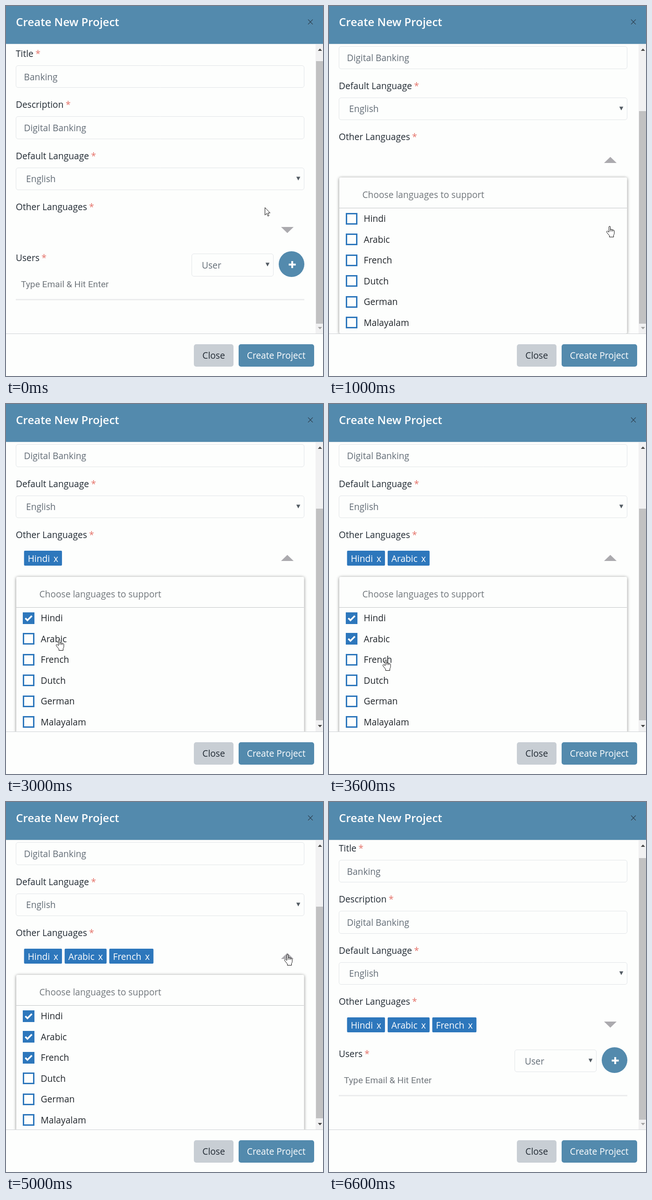
An HTML page with a canvas that plays this animation: 680 px wide and 792 px high, repeating every 7.6 s.

```html
<!DOCTYPE html>
<html lang="en">
<head>
<meta charset="utf-8">
<title>Create New Project</title>
<style>
  html, body { margin: 0; width: 100%; height: 100%; overflow: hidden; background: #fdfefd; }
  canvas { display: block; }
</style>
</head>
<body>
<canvas id="stage" width="680" height="792"></canvas>
<script>
const ctx = document.getElementById('stage').getContext('2d');
const LOOP = 7600, STEP = 200;
const BLUE = '#538aad', ACCENT = '#2d77bc', PAPER = '#fdfefd';
const INK = '#212a33', MUTED = '#626c76', EDGE = '#e2e5e8';
const SANS = '"Open Sans", sans-serif';
const languages = ['Hindi', 'Arabic', 'French', 'Dutch', 'German', 'Malayalam'];
const pickTimes = [2400, 3200, 4000];
const OPEN_AT = 800, CLOSE_AT = 5200;

// Pointer keys: time, x, y, shape
const pointerKeys = [
  [0, 555, 431, 'arrow'], [400, 592, 467, 'arrow'], [600, 595, 471, 'hand'],
  [1200, 595, 471, 'hand'], [2000, 112, 449, 'hand'], [2400, 112, 449, 'hand'],
  [3000, 107, 504, 'hand'], [3200, 107, 504, 'hand'], [3600, 115, 547, 'hand'],
  [4200, 115, 547, 'hand'], [5000, 597, 326, 'hand'], [5200, 615, 338, 'arrow'],
  [6200, 615, 338, 'arrow'], [6400, 626, 319, 'arrow'], [6600, 0, 0, 'none']
];

const arrowPath = new Path2D('M.5.5V16.5L4.3 13L6.8 18.8L9.2 17.8L6.8 12H11.5Z');
const handPath = new Path2D('M5.5 13V2Q5.5.5 7 .5T8.5 2V8Q8.5 6.8 10 6.8T11.5 8.3' +
  'Q11.5 7.4 12.8 7.5T14 9Q14.3 8.2 15.4 8.6T17 10V15.5Q17 17.5 15.5 19.5V23.5H6.5V20.5' +
  'L1.2 14Q0 12 1.2 11T3.7 11.7Z');
const knuckles = new Path2D('M8.5 8V11.5M11.5 8.3V11.5M14 9V11.5');

function text(str, x, y, color = INK, font = '19.2px ' + SANS) {
  ctx.font = font;
  ctx.fillStyle = color;
  ctx.fillText(str, x, y);
  return ctx.measureText(str).width;
}

function rect(x, y, w, h, color) {
  ctx.fillStyle = color;
  ctx.fillRect(x, y, w, h);
}

function box(x, y, w, h, radius, fill, stroke) {
  ctx.beginPath();
  ctx.roundRect(x, y, w, h, radius);
  ctx.fillStyle = fill;
  ctx.fill();
  if (stroke) {
    ctx.strokeStyle = stroke;
    ctx.lineWidth = 1;
    ctx.stroke();
  }
}

// A negative height points the triangle upwards.
function triangle(cx, cy, w, h, color) {
  ctx.beginPath();
  ctx.moveTo(cx - w / 2, cy - h / 2);
  ctx.lineTo(cx + w / 2, cy - h / 2);
  ctx.lineTo(cx, cy + h / 2);
  ctx.fillStyle = color;
  ctx.fill();
}

function line(points, color, width) {
  ctx.beginPath();
  points.forEach(([x, y]) => ctx.lineTo(x, y));
  ctx.strokeStyle = color;
  ctx.lineWidth = width;
  ctx.stroke();
}

function label(str, y) {
  const width = text(str + ' ', 21, y);
  text('*', 20.5 + width, y, '#e5736a');
}

function field(x, y, w, h = 48) {
  box(x + .5, y + .5, w - 1, h - 1, 4.5, PAPER, EDGE);
}

function drawTags(count, y) {
  let x = 38.7;
  ctx.font = '19.2px ' + SANS;
  for (const name of languages.slice(0, count)) {
    const nameWidth = ctx.measureText(name).width;
    const width = nameWidth + 34;
    box(x, y, width, 32, 2, ACCENT);
    text(name, x + 8, y + 24, '#fff');
    text('x', x + 16 + nameWidth, y + 24, '#fff');
    x += width + 5.7;
  }
}

function drawPanel(count) {
  const top = count ? 369 : 366;
  ctx.shadowColor = '#868686';
  ctx.shadowBlur = 6;
  ctx.shadowOffsetY = 1;
  box(22, top + 1, 617.5, 334, 3, PAPER);
  ctx.shadowColor = 'transparent';
  text('Choose languages to support', 71.5, top + 45, '#70767b');
  rect(22, top + 66, 617, 1, '#c3c6c8');
  languages.forEach((name, i) => {
    const rowY = top + 77 + i * 44.5;
    const y = Math.floor(rowY);
    rect(36, y, 25, 25, ACCENT);
    if (i < count) line([[41.5, y + 12.5], [46, y + 17], [55.5, y + 7.5]], '#fff', 3.6);
    else rect(39, y + 3, 19, 19, PAPER);
    text(name, 74.5, Math.round(rowY) + 19, '#20252a');
  });
}

function drawUsers(tagged) {
  label('Users', 546);
  field(398, 530, 176, tagged ? 48 : 49);
  text('User', 420, 562, MUTED);
  triangle(561, 553.5, 8.5, 8, '#535b63');
  box(585, 525, 55, 55, 27.5, BLUE);
  rect(606.5, 551.5, 15, 4, '#fff');
  rect(612, 546, 4, 15, '#fff');
  text('Type Email & Hit Enter', 32, 602, '#72787e', '19.2px Roboto, sans-serif');
  rect(21, 627, 619, 3, '#ecedee');
}

function drawScrollbar(open, count) {
  const [top, bottom] = open ? (count ? [224, 677] : [225, 680]) : [count ? 120 : 118, 680];
  rect(664, 82, 16, 619, '#f1f1f2');
  rect(665, top, 15, bottom - top, '#c1c1c2');
  triangle(673.5, 93.5, 9, -5, '#454545');
  triangle(673.5, 689.5, 9, 5, open && count ? '#454545' : '#a3a3a3');
}

function drawForm(open, count) {
  const shift = open ? -150 : count ? -3 : 0;
  ctx.save();
  ctx.beginPath();
  ctx.rect(0, 82, 680, 619);
  ctx.clip();
  label('Title', 109 + shift);
  field(21, 127 + shift, 619);
  text('Banking', 38.5, 159 + shift, MUTED);
  label('Description', 218 + shift);
  field(21, 236 + shift, 619, 49);
  text('Digital Banking', 38.5, 268 + shift, MUTED);
  label('Default Language', 328 + shift);
  field(21, 346 + shift, 619);
  text('English', 43, 377 + shift, MUTED);
  triangle(627, 369.5 + shift, 8.5, 8, '#535b63');
  label('Other Languages', 437 + shift);
  drawTags(count, 464 + shift);
  triangle(603.5, 479.5 + shift, 27, open ? -13 : 13, '#abaaae');
  if (open) drawPanel(count);
  else drawUsers(count > 0);
  drawScrollbar(open, count);
  ctx.restore();
}

function drawChrome() {
  rect(0, 0, 680, 81, BLUE);
  rect(0, 81, 680, 1, '#dce4e9');
  text('Create New Project', 21.3, 43, '#fff', '600 24px ' + SANS);
  for (const [dy, color] of [[1, '#6f9cba'], [0, '#2b465a']]) {
    line([[648, 29 + dy], [658, 39.5 + dy]], color, 1.4);
    line([[658, 29 + dy], [648, 39.5 + dy]], color, 1.4);
  }
  rect(0, 701, 680, 1, '#cfd2d5');
  box(403, 724, 85, 48, 5, '#c8ced4');
  text('Close', 421.3, 755);
  box(499, 724, 162, 48, 5, BLUE);
  text('Create Project', 516.8, 755, '#fff');
}

function drawPointer(t) {
  const i = pointerKeys.findLastIndex(key => key[0] <= t);
  const [t0, x0, y0, shape] = pointerKeys[i];
  if (shape === 'none') return;
  const [t1, x1, y1] = pointerKeys[i + 1];
  const p = (t - t0) / (t1 - t0);
  const ease = p * p * (3 - 2 * p);
  ctx.save();
  ctx.translate(Math.round(x0 + (x1 - x0) * ease), Math.round(y0 + (y1 - y0) * ease));
  const path = shape === 'hand' ? handPath : arrowPath;
  ctx.fillStyle = '#fff';
  ctx.strokeStyle = '#111';
  ctx.lineWidth = 1;
  ctx.fill(path);
  ctx.stroke(path);
  if (shape === 'hand') ctx.stroke(knuckles);
  ctx.restore();
}

function draw(now) {
  const t = Math.floor((now % LOOP) / STEP) * STEP;
  const open = t >= OPEN_AT && t < CLOSE_AT;
  const count = pickTimes.filter(time => t >= time).length;
  rect(0, 0, 680, 792, PAPER);
  drawForm(open, count);
  drawChrome();
  drawPointer(t);
}

const start = performance.now();
function tick() {
  draw(performance.now() - start);
  requestAnimationFrame(tick);
}
tick();
</script>
</body>
</html>
```
